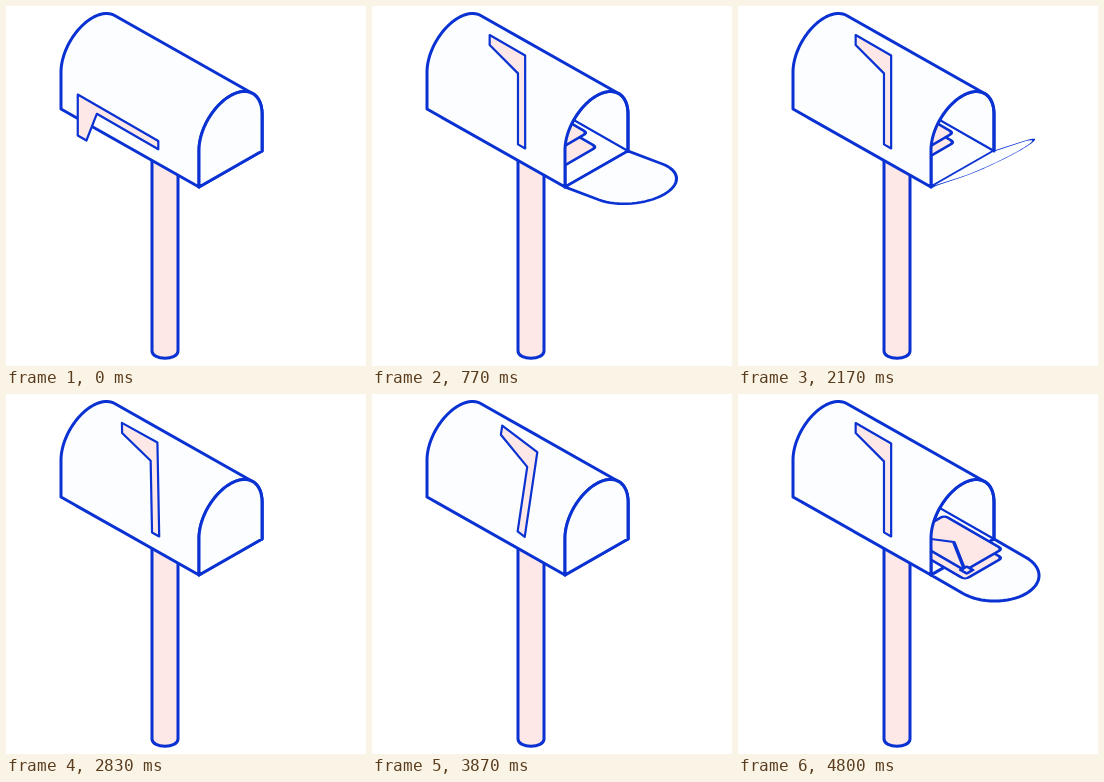
Recreate the animation shown at these times as an HTML page. Size 360 px wide and 360 px high, loop 5.4 s.

```html
<!DOCTYPE html>
<html lang="en">
<head>
<meta charset="utf-8">
<title>Mailbox</title>
<style>
  html, body { margin: 0; width: 100%; height: 100%; overflow: hidden; background: #fff; }
  svg { display: block; width: 100vw; height: 100vh; }
  .line { fill: none; }
  .white { fill: #fbfdff; }
  .pink { fill: #fde8e7; }
</style>
</head>
<body>
<svg viewBox="0 0 360 360" stroke="#0a31d2" stroke-width="3" stroke-linejoin="round" stroke-linecap="round">
  <defs><clipPath id="mouth"><path id="mouthShape"/></clipPath></defs>
  <path class="pink" d="M146 140V345C146 354.500 172 354.500 172 345V140Z"/>
  <path id="inside" class="white"/>
  <g clip-path="url(#mouth)"><path class="line" stroke-width="2.300" d="M256 145L186 105"/></g>
  <g id="doorBack"></g>
  <g clip-path="url(#mouth)">
    <g id="low"><rect class="pink" x="-67" width="67" height="43" rx="4"/></g>
    <g id="high">
      <rect class="pink" x="-67" width="67" height="43" rx="4"/>
      <path class="line" d="M-70 0L-35 22L0 0"/>
      <rect class="pink" x="-3" y="-2" width="7" height="7"/>
    </g>
  </g>
  <path id="body" class="white"/>
  <g id="doorFront"></g>
  <path id="door" class="white"/>
  <path id="flag" class="pink" stroke-width="2.200"/>
</svg>
<script>
const $ = id => document.getElementById(id);
const LOOP = 5400, CYCLE = 3600;
const HINGE = [224.5, 163], HALF = [31.5, -18], SIDE = 37, RADIUS = 36.3;
const BACK = [-138, -78];

// Points on the rounded top of the mailbox, angles in degrees
function arc(from, to, shift = [0, 0]) {
  const pts = [], n = 32;
  for (let i = 0; i <= n; i++) {
    const a = (from + (to - from) * i / n) * Math.PI / 180;
    pts.push([
      HINGE[0] + shift[0] + HALF[0] * Math.cos(a),
      HINGE[1] + shift[1] + HALF[1] * Math.cos(a) - SIDE - RADIUS * Math.sin(a)
    ]);
  }
  return pts;
}
const toPath = pts => "M" + pts.map(p => p[0].toFixed(2) + " " + p[1].toFixed(2)).join("L");

const LEFT = [193, 181], RIGHT = [256, 145];
const front = [LEFT, ...arc(180, 0), RIGHT];
const frontPath = toPath(front) + "Z";
$("inside").setAttribute("d", frontPath);
$("door").setAttribute("d", frontPath);
$("mouthShape").setAttribute("d", frontPath + "M193 181L256 145H360V260H193Z");
$("body").setAttribute("d",
  toPath([[55, 103], ...arc(180, 45.4, BACK), ...arc(45.4, 180), LEFT]) + "Z" +
  toPath([...arc(46, 0), RIGHT, ...arc(0, 46)]));

const clamp = x => Math.min(1, Math.max(0, x));
const span = (t, a, b) => clamp((t - a) / (b - a));
const outPow = (x, n) => 1 - Math.pow(1 - x, n);
const inOut = (x, n) => x < .5 ? Math.pow(2 * x, n) / 2 : 1 - Math.pow(2 - 2 * x, n) / 2;
const outBack = x => 1 + 2.70158 * Math.pow(x - 1, 3) + 1.70158 * Math.pow(x - 1, 2);

const FLAG = [[-37, -90], [4, -90], [4, 3], [-4.3, 3], [-4.3, -68], [-37, -80]];

function drawFlag(deg) {
  const a = deg * Math.PI / 180, c = Math.cos(a), s = Math.sin(a);
  const pts = FLAG.map(([x, y]) => {
    const u = x * c + y * s, v = y * c - x * s;
    return [149.7 + .866 * u, 137.5 + .5 * u + v];
  });
  $("flag").setAttribute("d", toPath(pts) + "Z");
}

function drawDoor(p) {
  // The door's height vector swings along a curve from upright to lying flat
  const q = 1 - p;
  const dx = 2 * p * q * 1.19 + p * p * .866;
  const dy = -q * q - 2 * p * q * .15 + p * p * .5;
  const k = -HALF[1] / HALF[0];
  const a = 1 - k * dx, b = -k * (1 + dy), c = -dx, d = -dy;
  const e = HINGE[0] - a * HINGE[0] - c * HINGE[1];
  const f = HINGE[1] - b * HINGE[0] - d * HINGE[1];
  const door = $("door");
  door.setAttribute("transform", `matrix(${[a, b, c, d, e, f].map(n => n.toFixed(5))})`);
  const home = $(dy + k * dx > 0 ? "doorBack" : "doorFront");
  if (door.parentNode !== home) home.appendChild(door);
}

function drawLetter(id, y, out) {
  const s = (out - 1) * 56.5;
  $(id).setAttribute("transform", `matrix(.866 .5 .866 -.5 ${227 + .866 * s} ${y + .5 * s})`);
}

function draw(time) {
  const t = time % LOOP % CYCLE;
  const up = outBack(span(t, 30, 450)) - inOut(span(t, 2760, 3600), 2);
  drawFlag(90 * (1 - up));
  drawDoor(outPow(span(t, 540, 1200), 5) - Math.pow(span(t, 1800, 2400), 1.3));
  drawLetter("low", 185.5, outPow(span(t, 740, 1200), 3) - inOut(span(t, 1840, 2240), 3));
  drawLetter("high", 176.5, outPow(span(t, 775, 1200), 3) - inOut(span(t, 1800, 2160), 3));
}

const start = performance.now();
function tick() {
  draw(performance.now() - start);
  requestAnimationFrame(tick);
}
tick();
</script>
</body>
</html>
```
